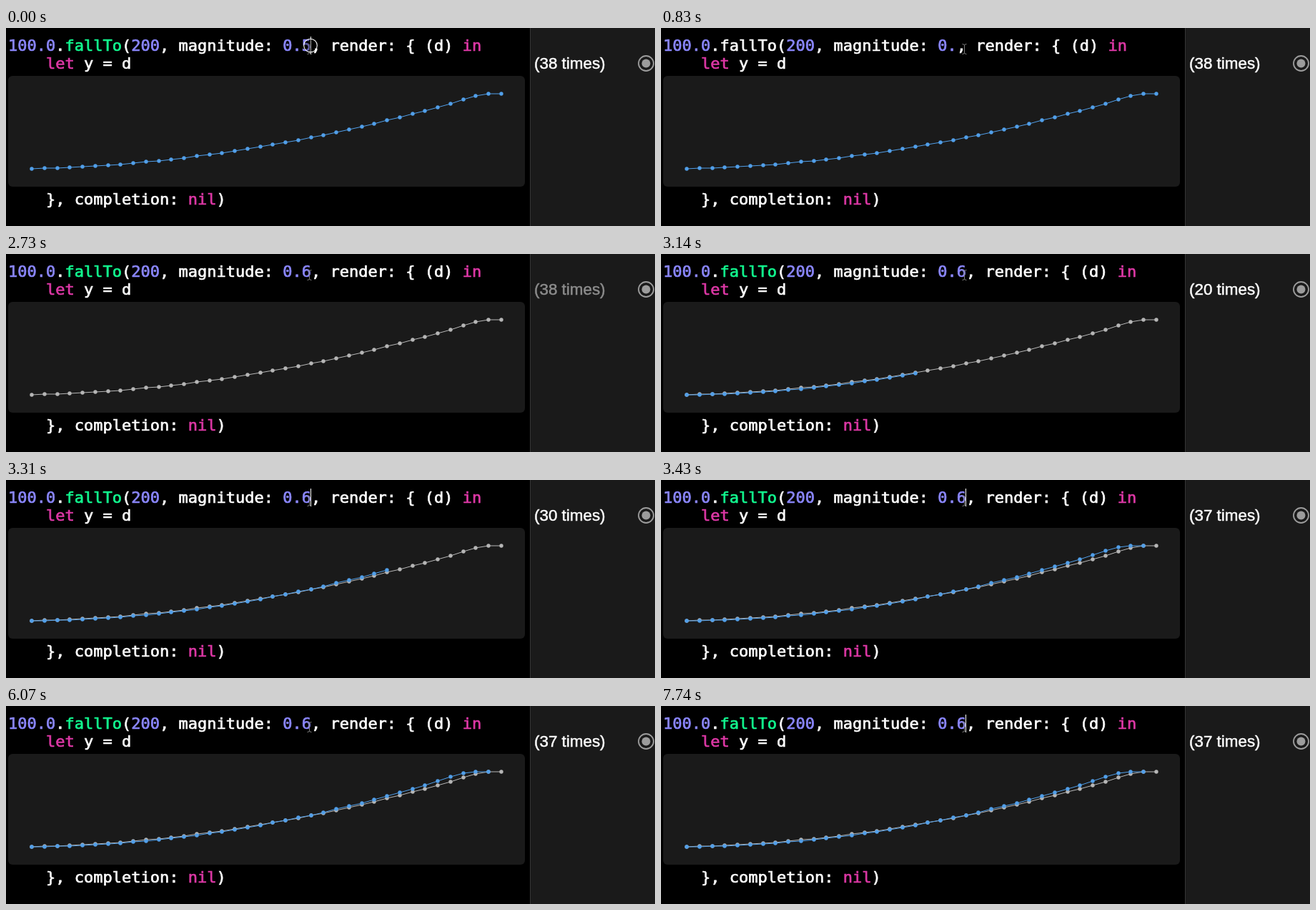
Animation of 908 by 277 pixels, one loop 8 s. Source, as an HTML page:

```html
<!DOCTYPE html>
<html lang="en">
<head>
<meta charset="utf-8">
<title>Playground graph</title>
<style>
  html, body { margin: 0; width: 100%; height: 100%; overflow: hidden; background: #000; }
  svg { display: block; width: 908px; height: 277px; }
  text, tspan { fill: currentColor; stroke: currentColor; }
  text { color: #fff; stroke-width: .7px; white-space: pre; }
  .code { font: 22px "DejaVu Sans Mono", monospace; }
  .num { color: #8b87ff; }
  .key { color: #de38a6; }
  .call { color: #12fa90; }
  #count { font: 22.4px "Liberation Sans", Arial, sans-serif; stroke-width: .5px; }
  #count.stale { color: #8c8c8c; }
</style>
</head>
<body>
<svg viewBox="0 0 908 277">
  <rect x="733" width="175" height="277" fill="#1a1a1a"/>
  <rect x="733" width="1" height="277" fill="#363636"/>
  <rect x="3" y="67" width="723" height="155" rx="6" fill="#1a1a1a"/>

  <g class="code">
    <text x="3" y="32"><tspan class="num">100.0</tspan>.<tspan id="call" class="call">fallTo</tspan>(<tspan class="num">200</tspan>, magnitude: <tspan class="num">0.<tspan id="digit">5</tspan></tspan>, render: { (d) <tspan class="key">in</tspan></text>
    <text x="56" y="57"><tspan class="key">let</tspan> y = d</text>
    <text x="56" y="247">}, completion: <tspan class="key">nil</tspan>)</text>
  </g>

  <g id="before"></g>
  <g id="after"></g>

  <text id="count" x="739" y="57"></text>
  <circle cx="895.5" cy="49.5" r="10.5" fill="none" stroke="#9c9c9c" stroke-width="1.8"/>
  <circle cx="895.5" cy="49.5" r="6" fill="#9c9c9c"/>

  <rect id="caret" y="12" width="1" height="25" fill="#fff"/>
  <path d="M421.5 22.5q3 0 3 2v10q0 2-3 2M427.5 22.5q-3 0-3 2M424.5 34.5q0 2 3 2" fill="none" stroke="#8c8c8c" stroke-width=".9"/>
  <circle id="ring" cx="426" cy="24.5" r="9.3" fill="#000" fill-opacity=".3" stroke="#fff" stroke-width="1.1"/>
</svg>
<script>
const LOOP = 8000, BLUE = '#519fe9', GRAY = '#b6b6b6';
const ERASE = 240, TYPE = 1060, RERUN = 3030;

// Height of the graph after i calls, levelling off at the end value.
const slow = i => Math.min(105, .431 * i + .0709 * i * i);
const fast = i => Math.min(105, .15 * i + .085 * i * i);

const $ = id => document.getElementById(id);
const show = (id, on) => $(id).style.display = on ? '' : 'none';

function plot(id, height, n, color) {
  const pts = Array.from({ length: n }, (_, i) =>
    [Math.round(36 + i * 657 / 37), Math.round(197 - height(i))]);
  $(id).innerHTML = `<polyline fill="none" stroke="${color}" points="${pts.join(' ')}"/>` +
    pts.map(([x, y]) => `<circle cx="${x}" cy="${y}" r="2.7" fill="${color}"/>`).join('');
}

// The rerun refreshes the view every 55 ms, a few calls at a time.
function callsAt(t) {
  if (t < RERUN) return 0;
  const tick = Math.floor((t - RERUN) / 55);
  return Math.min(37, Math.round(13.2 + 3.4 * tick));
}

function caretOn(t) {
  const key = t < ERASE ? 0 : t < TYPE ? ERASE : TYPE;
  return Math.floor(Math.max(0, t - key - 12) / 552) % 2 === 0;
}

let drawn = '';
function draw(now) {
  const t = now % LOOP;
  const erased = t >= ERASE && t < TYPE;
  const stale = t >= 890;
  const calls = callsAt(t);

  show('ring', t < 60);
  show('caret', caretOn(t));
  $('caret').setAttribute('x', erased ? 413 : 426);
  $('digit').textContent = erased ? '' : t < ERASE ? '5' : '6';
  $('call').setAttribute('class', t >= 350 && t < 1180 ? '' : 'call');

  const state = stale + ':' + calls;
  if (state !== drawn) {
    drawn = state;
    plot('before', slow, 38, stale ? GRAY : BLUE);
    plot('after', fast, calls === 37 ? calls : Math.max(0, calls - 1), BLUE);
    $('count').textContent = `(${calls || 38} times)`;
    $('count').setAttribute('class', stale && !calls ? 'stale' : '');
  }
  requestAnimationFrame(draw);
}
draw(0);
</script>
</body>
</html>
```
